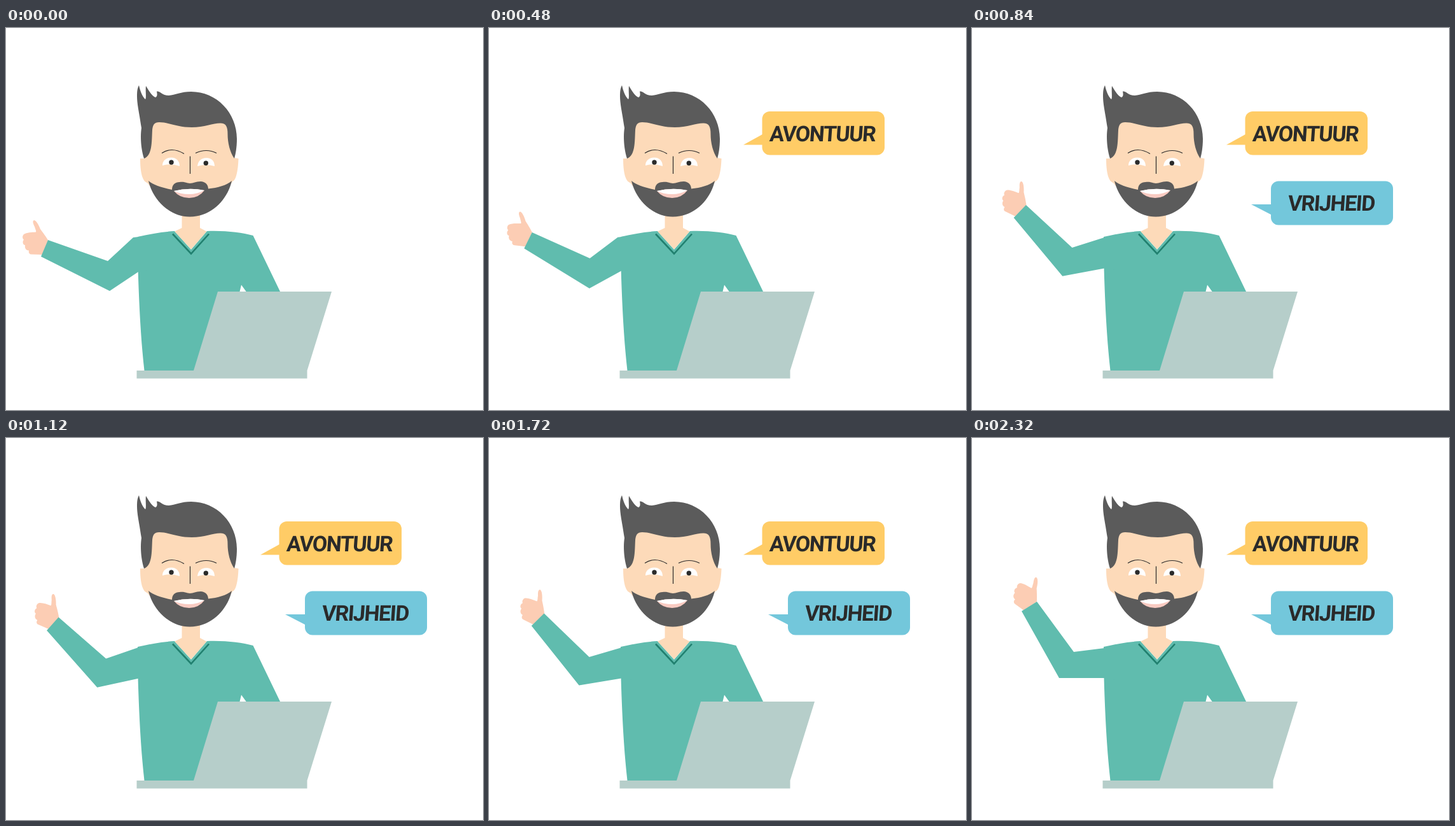
Write an HTML page that moves like this. It is 750 px wide and 600 px high and loops after 2.36 s.

```html
<!DOCTYPE html>
<html lang="nl">
<head>
<meta charset="utf-8">
<title>Avontuur en vrijheid</title>
<style>
  html, body { margin: 0; width: 100%; height: 100%; overflow: hidden; background: #fff; }
  svg { display: block; width: 100%; height: 100%; }
  text {
    font: 700 34px Roboto, sans-serif;
    letter-spacing: -1.5px;
    text-anchor: middle;
    fill: #2a2a2a;
  }
  .skin { fill: #fddab9; }
  .hair { fill: #5b5b5b; }
  .knit { fill: #60bcae; }
  .line { fill: none; stroke: #2a2a2a; stroke-width: 1.2; }
</style>
</head>
<body>
<svg viewBox="0 0 750 600">
  <!-- body -->
  <path class="knit" d="M207 328C228 323 246 320 265 319L291 348L316 319C345 318 370 321 388.500 326L431 414L420 420H382L370 403.500L366 420L300 538H217.500C212 490 209 430 207.500 376Z"/>
  <path class="skin" d="M276.500 288H305V314L315.500 319.500L291 347.500L265 319.500L276.500 314Z"/>
  <path fill="none" stroke="#21806f" stroke-width="2.600" d="M262 323.500L291 354.500L319 323.500"/>
  <path id="hand" fill="#fccdb4" d="M66 333C61 325 57 320 54 316C51 308 47 302 44 302C41 303 43 308 45 312C46 316 48 319 47 320.500C40 321 33 321 28 324C25 327 26 331 28 332.500C25 336 27 341 30 341C29 346 32 349.500 36 349.500C35 353 37 355.500 40 355.500L57 356Z"/>
  <path id="arm" class="knit"/>
  <path fill="#b6ceca" d="M333 414H512L473.500 538V550.500H205.500V538H295Z"/>

  <!-- head -->
  <path class="skin" d="M211 205C211 225 214 241 222 243L231 254H348L356 241C362 240 365 222 365.500 205L359 204L350 145H230L217 205Z"/>
  <path class="hair" d="M217 205C212 190 211 170 213 157C209 130 206 120 206 106C206 98 207 94 209 90C211 99 214 107 219 112C221 110 219 99 220 91C226 101 230 107 235 109C238 108 238 104 237 99.500C243 99 245 106 256 106C266 105 275 100 291 100C331 100 363 133 363 174C363 188 361 198 359 205C352 195 348.500 180 348.500 167C348.500 155 346 149.500 337 149.500C325 149.500 312 156 292 156C270 156 255 148 241 148C233 148 231 152 230 160C229 180 230 200 217 205Z"/>
  <path class="hair" d="M224 240C232 247 247 251 261 254C261 246 266 242 273 242C281 241 284 244 289 244C295 244 298 241 306 241C313 241 318 246 318 252.500C333 251 347 247 355 240C349 268 324 296.500 289 296.500C256 296.500 230 268 224 240Z"/>
  <path fill="#f9cbc2" d="M264 256Q288 250 312 255Q303 267 288 267Q273 267 264 256Z"/>
  <path fill="#fff" d="M264 256Q288 250 312 255Q300 261 288 261Q274 261 264 256Z"/>
  <path fill="#fff" d="M246 216C246 208 252 203.500 260 203.500C268 203.500 273 209 273 217Q260 212 246 216ZM301 217C302 209 307 204 315 204C323 204 328 209 328 217Q314 213 301 217Z"/>
  <g fill="#2a2a2a"><circle cx="260" cy="211" r="3.700"/><circle cx="314.300" cy="212.300" r="3.700"/></g>
  <path class="line" d="M245 196.500Q261 186 280 197.500M298 196.500Q315 188.500 331 196.500M289.500 201.500V229"/>

  <!-- words -->
  <g id="first">
    <path fill="#ffcc66" d="M430 167L400 183.500H430Z"/>
    <rect x="429.500" y="131" width="192.500" height="68.500" rx="12" fill="#ffcc66"/>
    <text transform="translate(523.500 177.500) skewX(-4)">AVONTUUR</text>
  </g>
  <g id="second">
    <path fill="#73c7db" d="M471 277H439L471 293.500Z"/>
    <rect x="470" y="240.500" width="192" height="69" rx="12" fill="#73c7db"/>
    <text transform="translate(564 287) skewX(-4)">VRIJHEID</text>
  </g>
</svg>
<script>
const LOOP = 2360, STEP = 40;
const el = id => document.getElementById(id);
const hand = el('hand'), arm = el('arm');
const first = el('first'), second = el('second');

// Lift of the waving arm over time: 0 is lowest, 1 is highest
const wave = [
  [0, 0], [280, .6], [320, .526], [560, .05], [640, .3], [840, .69],
  [980, .25], [1120, .64], [1200, .79], [1480, .2], [1720, .725],
  [1800, 1], [2080, .237], [2120, .09], [2240, .62], [2320, 1]
];
const slope = i => (wave[i + 1][1] - wave[i][1]) / (wave[i + 1][0] - wave[i][0]);
const tangents = wave.map((_, i) => {
  if (i === 0) return slope(0);
  if (i === wave.length - 1) return slope(i - 1);
  const a = slope(i - 1), b = slope(i);
  return a * b > 0 ? 2 * a * b / (a + b) : 0;
});

function liftAt(t) {
  let i = 0;
  while (i < wave.length - 2 && t > wave[i + 1][0]) i++;
  const [t0, p0] = wave[i], [t1, p1] = wave[i + 1];
  const h = t1 - t0, u = Math.min(1, (t - t0) / h), v = 1 - u;
  return v * v * (1 + 2 * u) * p0 + u * u * (3 - 2 * u) * p1
    + h * u * v * (v * tangents[i] - u * tangents[i + 1]);
}

// Joint position as a quadratic in the lift
const joint = (x, y, bx, by, ax, ay) => p =>
  [x + bx * p + ax * p * p, y + by * p + ay * p * p];
const cuffTop = joint(66, 333, 8.2, -88, 27.8, 12);
const cuffLow = joint(55, 359, -1.5, -92, 24.5, 5);
const innerElbow = joint(160, 366, -12, -31, 12, 1);
const outerElbow = joint(163, 413, -39, -28.4, 13, -7.6);
const armpit = joint(208, 383, 0, -12, 0, 6);

function drawArm(p) {
  const top = cuffTop(p), low = cuffLow(p);
  const shoulder = [Math.min(200 + 17 * p, 208), 329 - 2 * p + 3 * p * p];
  const points = [top, innerElbow(p), shoulder, [225, 326], [225, 380],
    armpit(p), outerElbow(p), low];
  arm.setAttribute('d', 'M' + points.join('L') + 'Z');
  const x = (top[0] + low[0]) / 2, y = (top[1] + low[1]) / 2;
  hand.setAttribute('transform',
    `translate(${x} ${y}) rotate(${34.5 * p}) translate(-60.5 -346)`);
}

function drawBubble(node, t, start, dx, dy) {
  const k = Math.max(0, Math.min(1, (t - start) / 240));
  node.setAttribute('opacity', k);
  node.setAttribute('transform', `translate(${dx * (1 - k)} ${dy * (1 - k)})`);
}

function draw(t) {
  drawArm(liftAt(t));
  drawBubble(first, t, 240, -25, 42);
  drawBubble(second, t, 480, -40, 31);
}

const begin = performance.now();
function tick() {
  const t = (performance.now() - begin) % LOOP;
  draw(Math.floor(t / STEP) * STEP);
  requestAnimationFrame(tick);
}
draw(0);
requestAnimationFrame(tick);
</script>
</body>
</html>
```
